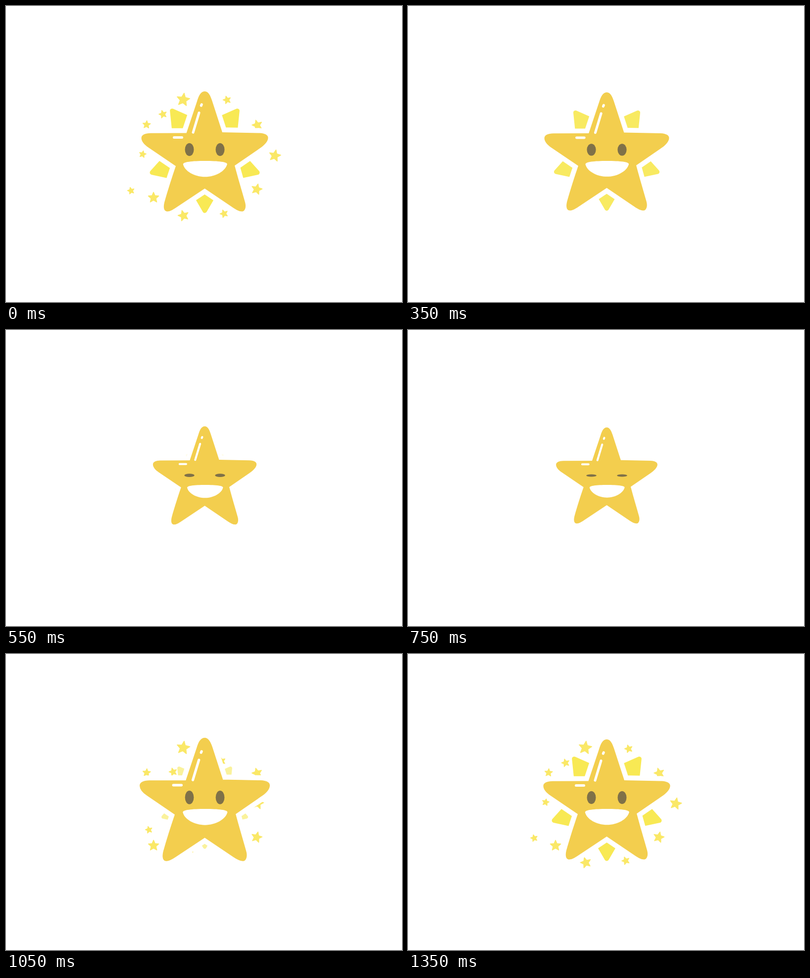
An HTML page that plays this animation: 800x600 px, repeating every 1400 ms.

```html
<!DOCTYPE html>
<html lang="en">
<head>
<meta charset="utf-8">
<title>Twinkling star</title>
<style>
html, body { margin: 0; width: 100%; height: 100%; overflow: hidden; background: #fff; }
svg { display: block; width: 100vw; height: 100vh; }
</style>
</head>
<body>
<svg viewBox="0 0 800 600">
  <defs>
    <path id="shape" d="M364.5 257.5 L386 193 C389 183 393 173 401.5 173 C409 173 413 182 416 191 L437 256
      L512 257.5 C524 258 529.5 262 529.5 267 C529.5 275 521 283 512 289 L462 323.5
      C469 350 476 373 483 398 C486 409 482 416.5 477 416.5 C471 416.5 465 413 459 409 L401.5 370
      L343 409 C337 413 331 416.5 326 416.5 C320 416.5 317 411 320 398 C327 373 336 345 343 324.5
      L288 287 C279 281 273.5 274 273.5 267.5 C273.5 261 281 258 292 257.7 Z"/>
  </defs>
  <g id="rays" fill="#f8e954" stroke="#f8e954" stroke-width="9" stroke-linejoin="round"></g>
  <g id="sparks" fill="#fae867" stroke="#fae867" stroke-width="1.6" stroke-linejoin="round"></g>
  <g id="body">
    <use id="outline" href="#shape" fill="#fff" stroke="#fff"/>
    <use id="fill" href="#shape" fill="#f3ce4e" stroke="#f3ce4e" stroke-linejoin="round"/>
    <path d="M394.3 202 L395.2 199.6 M378 256.2 L390 216.5 M339.5 266.5 H355.5"
      fill="none" stroke="#fff" stroke-width="5" stroke-linecap="round"/>
  </g>
  <g id="eyes" fill="#7f7148"><ellipse cx="370.5"/><ellipse cx="432.5"/></g>
  <path id="mouth" fill="#fff" d="M357.8 321 C357 316 376 314 402 314 C429 314 448 316 446.7 321
    C443 335 423 346.3 402 346.3 C381 346.3 361 335 357.8 321 Z"/>
</svg>
<script>
const LOOP = 1400, STEP = 50;
const SHRINK = 300, POP = 850;
const CX = 401.5, CY = 300, RAY_CY = 303;
const $ = id => document.getElementById(id);

function set(node, attrs) {
  for (const key in attrs) node.setAttribute(key, attrs[key]);
  return node;
}

function add(parent, tag, attrs) {
  return parent.appendChild(set(document.createElementNS("http://www.w3.org/2000/svg", tag), attrs));
}

const scaleAbout = (x, y, s) => `translate(${x} ${y}) scale(${s}) translate(${-x} ${-y})`;

// Distance left to rest for a damped spring: 1 at the start, dips below 0 at 150 ms
function spring(ms) {
  if (ms <= 0) return 1;
  const turn = Math.PI / 150, damping = turn * .51;
  return Math.exp(-damping * ms) * (Math.cos(turn * ms) + .51 * Math.sin(turn * ms));
}

// 0 at full size, 1 when fully squeezed
function squeeze(t, popTime) {
  if (t >= popTime) return spring(t - popTime);
  return 1 - Math.exp(-Math.pow(Math.max(0, t - SHRINK) / 164, 2.1));
}

// Share of the way left between two times, slowing down towards the end
function remaining(t, from, to, power) {
  return Math.pow(1 - Math.min(1, Math.max(0, (t - from) / (to - from))), power);
}

for (let i = 0; i < 5; i++) {
  add($("rays"), "path", {
    d: `M${CX} ${RAY_CY + 112} l-29 -50 h58 Z`,
    transform: `rotate(${72 * i} ${CX} ${RAY_CY})`,
  });
}

function makeSpark([x, y, r, tilt]) {
  let d = "";
  for (let i = 0; i < 10; i++) {
    const a = Math.PI * i / 5, reach = i % 2 ? r * .46 : r;
    d += `${i ? "L" : "M"}${(reach * Math.sin(a)).toFixed(2)} ${(-reach * Math.cos(a)).toFixed(2)}`;
  }
  return { x, y, tilt, node: add($("sparks"), "path", { d: d + "Z" }) };
}

// x, y, radius, tilt
const early = [
  [358, 190, 13.5, 8], [284, 240.5, 8, 4], [298, 388.5, 11, 0], [506.5, 371.5, 11, 14], [507.5, 241.5, 10.5, -16],
].map(makeSpark);
const late = [
  [317, 219.5, 8, -16], [276, 300.5, 7, 12], [252.5, 374.5, 7, -14], [358.5, 425, 11, -16],
  [440.5, 421, 8, -20], [543, 303.5, 12, 12], [446.5, 190.5, 8, -16],
].map(makeSpark);

function placeSparks(sparks, t, birth, spread) {
  const size = t < SHRINK ? Math.max(0, 1 - Math.pow(t / 200, 1.5)) : t >= birth ? 1 : 0;
  for (const { x, y, tilt, node } of sparks) {
    set(node, {
      transform: `translate(${CX + (x - CX) * spread} ${CY + (y - CY) * spread}) rotate(${tilt}) scale(${size})`,
      visibility: size ? "visible" : "hidden",
    });
  }
}

function draw(t) {
  const body = squeeze(t, POP);
  const face = squeeze(t, POP - 18);

  // The body swells briefly as it pops open
  const beat = Math.max(0, t - POP) / 50;
  const swell = 6 * beat * Math.exp(1 - beat);
  set($("body"), { transform: scaleAbout(CX, 295, 1 - .2 * body) });
  set($("fill"), { "stroke-width": swell });
  set($("outline"), { "stroke-width": 20 + swell });

  set($("mouth"), { transform: scaleAbout(402, 314, 1 - .205 * face) });
  for (const eye of $("eyes").children) {
    set(eye, { rx: 9 + 1.3 * face, ry: 13 - 10.5 * face, cy: 291 + 4 * face });
  }

  const hidden = t < POP ? body : remaining(t, 950, LOOP, 3.4);
  set($("rays"), { transform: scaleAbout(CX, RAY_CY, 1 - .5 * hidden), opacity: 1 - hidden });

  const resting = t < SHRINK;
  placeSparks(early, t, POP, resting ? 1 : 1 - .25 * spring(t - POP + 50));
  placeSparks(late, t, POP + 100, resting ? 1 : 1 - .4 * remaining(t, 900, LOOP, 1.4));
}

const start = performance.now();
function tick() {
  const t = (performance.now() - start) % LOOP;
  draw(Math.floor(t / STEP) * STEP);
  requestAnimationFrame(tick);
}
draw(0);
requestAnimationFrame(tick);
</script>
</body>
</html>
```
